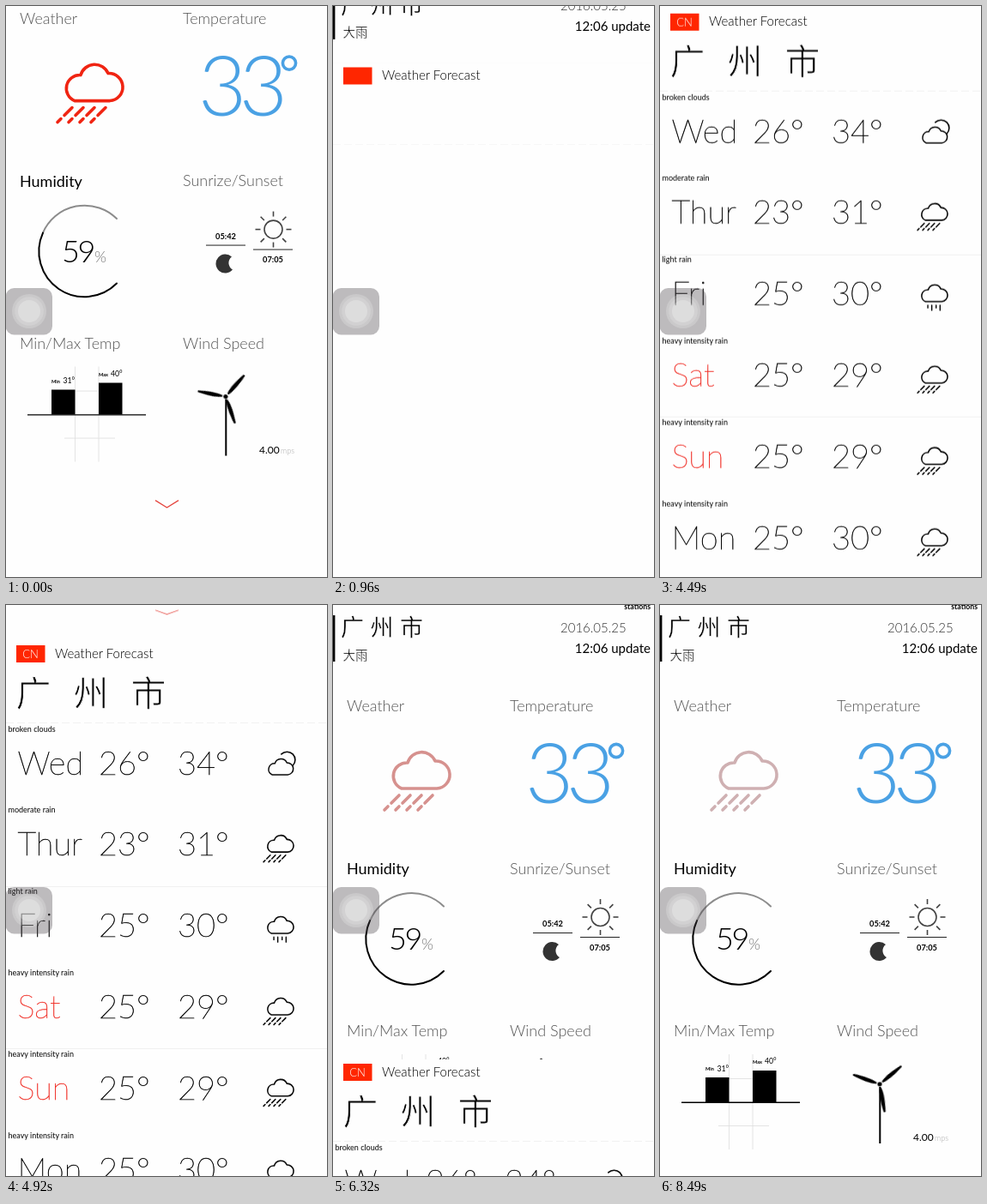
Animation of 374x666 px, one loop 8590 ms. Source, as an HTML page:

```html
<!DOCTYPE html>
<html lang="en">
<head>
<meta charset="utf-8">
<title>Weather</title>
<style>
html, body { margin: 0; width: 100%; height: 100%; overflow: hidden; background: #fefefe; }
svg { display: block; width: 374px; height: 666px; font-family: Lato, "Open Sans", sans-serif; }
/* the background-coloured outline slims the glyphs */
.cjk { font-family: "Noto Sans CJK SC", "Noto Sans CJK", sans-serif; font-weight: 300; stroke: #fefefe; }
.line { fill: none; stroke: #000; stroke-linecap: round; stroke-linejoin: round; }
.label { font-size: 18px; font-weight: 300; fill: #555; }
.big { font-size: 38px; font-weight: 200; stroke: #000; stroke-width: .5; }
.weekend { fill: #f0332b; stroke: #f0332b; }
.chevron { fill: none; stroke: #e5463f; stroke-width: 1.3; }
.main, .sheet, .late, .hint, .blades, .now { animation: 8.59s linear infinite; }
.main { animation-name: main; }
.sheet { animation-name: sheet; }
.late { animation-name: late; }
.hint { animation-name: hint; transform-origin: 187px -36px; }
.blades { animation-name: turn; transform-origin: 256px 559px; }
.now { animation-name: pulse; }

@keyframes main {
  0% { transform: translateY(-103px); visibility: visible; animation-timing-function: ease-out; }
  7.93% { transform: translateY(-272px); animation-timing-function: linear(0, .293 5%, .5 10%, .646 15%, .75 20%, .823 25%, .875 30%, .912 35%, .938 40%, .969 50%, .984 60%, .996 80%, 1); }
  17.68% { transform: none; visibility: visible; }
  17.7%, 71.2% { transform: none; visibility: hidden; }
  71.22%, 100% { transform: none; visibility: visible; }
}
@keyframes sheet {
  0% { transform: translateY(666px); }
  7.93% { transform: translateY(666px); animation-timing-function: linear(0, .293 5%, .5 10%, .646 15%, .75 20%, .823 25%, .875 30%, .912 35%, .938 40%, .969 50%, .984 60%, .996 80%, 1); }
  17.68%, 51.8% { transform: translateY(0); }
  57.28% { transform: translateY(42px); }
  62.4% { transform: translateY(62px); }
  67.4% { transform: translateY(76px); }
  71.5% { transform: translateY(86px); animation-timing-function: linear(0, .293 5%, .5 10%, .646 15%, .75 20%, .823 25%, .875 30%, .912 35%, .938 40%, .969 50%, .984 60%, .996 80%, 1); }
  81.4%, 100% { transform: translateY(666px); }
}
@keyframes late {
  0%, 18.86% { opacity: 0; }
  25.4%, 90% { opacity: 1; }
  90.1%, 100% { opacity: 0; }
}
@keyframes hint {
  0%, 51.7% { opacity: 0; transform: scaleY(0); }
  51.8% { opacity: 1; transform: scaleY(0); }
  57.28% { transform: scaleY(.58); }
  67.4% { transform: scaleY(1); }
  71.5% { opacity: 1; transform: scaleY(1.1); }
  71.6%, 100% { opacity: 0; transform: scaleY(1.1); }
}
@keyframes turn {
  0% { transform: rotate(41deg); }
  84.63% { transform: rotate(1069.5deg); }
  98.84% { transform: rotate(1250deg); }
  100% { transform: rotate(1265deg); }
}
@keyframes pulse {
  0%, 84.63% { stroke: #f02412; }
  14.2%, 70.4%, 98.84%, 100% { stroke: #cfb0b2; }
}
</style>
</head>
<body>
<svg viewBox="0 0 374 666">
  <defs>
    <path id="cloud" d="M121 214H80A15.6 15.6 0 0 1 87 184A17 17 0 0 1 119 182A16 16 0 0 1 121 214Z"/>
    <g id="heavy">
      <use href="#cloud"/>
      <path d="M77 222l-9 9M90 222l-9 9M103 222l-9 9M116 222l-9 9M64 235l-4 4M77 235l-4 4M90 235l-4 4M103 235l-4 4"/>
    </g>
    <g id="light">
      <use href="#cloud"/>
      <path d="M86 223v7M96 223v13M107 223v7M117 223v13" stroke-width="3"/>
    </g>
    <g id="broken">
      <use href="#cloud" transform="translate(6 21) scale(.95)"/>
      <path d="M105 172A20.500 20.500 0 0 1 134 201"/>
    </g>
    <path id="blade" d="M-1 -4C-3.2 -11 -2.8 -20 -1.2 -33L1 -33C2.8 -20 2.6 -10 1 -4Z"/>
  </defs>

  <g class="main">
    <path d="M0 12h2.4v54H0z"/>
    <text x="9" y="36" class="cjk" font-size="27" letter-spacing="7.5" stroke-width=".4">广州市</text>
    <text x="11.5" y="63.5" class="cjk" font-size="14.5" stroke-width=".35">大雨</text>
    <text x="370" y="4.5" font-size="8.7" font-weight="700" text-anchor="end">stations</text>
    <text x="265" y="32" font-size="15" font-weight="300" fill="#333">2016.05.25</text>
    <text x="370" y="56" font-size="15" text-anchor="end">12:06 update</text>

    <g class="label">
      <text x="16" y="124">Weather</text>
      <text x="206" y="124">Temperature</text>
      <text x="16" y="314" fill="#000" font-weight="400">Humidity</text>
      <text x="206" y="313.5">Sunrize/Sunset</text>
      <text x="16" y="503">Min/Max Temp</text>
      <text x="206" y="503">Wind Speed</text>
    </g>

    <use href="#heavy" class="line now" stroke-width="3.6"/>

    <g fill="#4aa1e4">
      <text x="224" y="231" font-size="97" font-weight="300" letter-spacing="-8.5">33</text>
      <circle cx="330" cy="170" r="7.6" fill="none" stroke="#4aa1e4" stroke-width="3.6"/>
    </g>

    <g class="line" stroke-width="2">
      <path d="M129 351.5A53 53 0 0 0 43 368" stroke="#8c8c8c"/>
      <path d="M43 368A53 53 0 0 0 129 427"/>
    </g>
    <text x="65" y="402" font-size="36" font-weight="300" letter-spacing="-2.5">59</text>
    <text x="103" y="402" font-size="18" font-weight="300" fill="#777">%</text>

    <g font-size="9.3" font-weight="700" text-anchor="middle">
      <text x="256" y="375">05:42</text>
      <text x="311" y="402.5">07:05</text>
    </g>
    <path d="M233 382.5h46M288 387.5h46" stroke="#222"/>
    <path d="M263 396A11 11 0 1 0 264 411A9 9 0 0 1 263 396Z" fill="#333"/>
    <g id="sun" fill="none" stroke="#444" stroke-width="1.6" transform="translate(311.5 364)">
      <circle r="10.5"/>
    </g>

    <path d="M80.5 524v111M108 524v111M80 552.5h28M68 607.5h59" stroke="#ddd" stroke-width=".8"/>
    <path d="M53 551h27.5v29H53zM108 543h27.5v37H108z"/>
    <path d="M25 580.3h138" stroke="#000" stroke-width="1.4"/>
    <g font-size="5.6" font-weight="700">
      <text x="53" y="543">Min</text>
      <text x="108" y="535">Max</text>
    </g>
    <g font-size="8.7">
      <text x="66.5" y="543.5">31°</text>
      <text x="122" y="535">40°</text>
    </g>

    <path d="M256.300 562v66" stroke="#000" stroke-width="2"/>
    <g class="blades"><g id="rotor" transform="translate(256 559)"><circle r="2.6"/></g></g>
    <text x="295" y="625" font-size="12">4.00</text>
    <text x="320" y="625" font-size="9" font-weight="300" fill="#aaa">mps</text>

    <path class="chevron" d="M174 680l13.5 8.5l13.5 -8.5"/>
  </g>

  <g class="sheet">
    <rect width="374" height="700" fill="#fefefe"/>
    <path class="chevron hint" d="M174 -36l13.5 8.5l13.5 -8.5"/>
    <path d="M12 5h33.500v20H12z" fill="#ff2600"/>
    <text x="57" y="19.5" font-size="15" font-weight="300">Weather Forecast</text>
    <path d="M0 95.5h374" stroke="#f1f1f1" stroke-dasharray="9 4"/>
    <g class="late">
      <path d="M0 286.5h374M0 475.5h374" stroke="#f0f0f0"/>
      <text x="28.5" y="19.5" font-size="13" font-weight="300" fill="#fff" text-anchor="middle">CN</text>
      <text x="11.5" y="75.5" class="cjk" font-size="41" letter-spacing="26" stroke-width="1">广州市</text>
      <g id="rows"></g>
    </g>
  </g>

  <g transform="translate(27 356)">
    <rect x="-27.5" y="-27" width="54.5" height="54.5" rx="10" fill="#464146" fill-opacity=".35"/>
    <g fill="#fff">
      <circle r="20" fill-opacity=".2"/>
      <circle r="16.8" fill-opacity=".12"/>
      <circle r="13" fill-opacity=".25"/>
    </g>
  </g>
</svg>
<script>
const fill = (id, html) => document.getElementById(id).insertAdjacentHTML("beforeend", html);

const days = [
  ["Wed", 26, 34, "broken clouds", "broken"],
  ["Thur", 23, 31, "moderate rain", "heavy"],
  ["Fri", 25, 30, "light rain", "light"],
  ["Sat", 25, 29, "heavy intensity rain", "heavy"],
  ["Sun", 25, 29, "heavy intensity rain", "heavy"],
  ["Mon", 25, 30, "heavy intensity rain", "heavy"]
];

fill("rows", days.map(([day, low, high, sky, icon], i) => `
  <g transform="translate(0 ${i * 94.9})">
    <text x="2.5" y="105.5" font-size="9">${sky}</text>
    <g class="big">
      <text x="13.5" y="155.5" class="${day[0] === "S" ? "weekend" : ""}">${day}</text>
      <text x="108" y="155.5">${low}°</text>
      <text x="200" y="155.5">${high}°</text>
    </g>
    <use href="#${icon}" class="line" stroke-width="3.4"
      transform="translate(272.5 52.8) scale(.46)"/>
  </g>`).join(""));

fill("sun", Array.from({ length: 8 }, (_, i) =>
  `<path d="M0 -15v-6" transform="rotate(${i * 45})"/>`).join(""));

fill("rotor", [0, 120, 240].map(a =>
  `<use href="#blade" transform="rotate(${a})"/>`).join(""));
</script>
</body>
</html>
```
